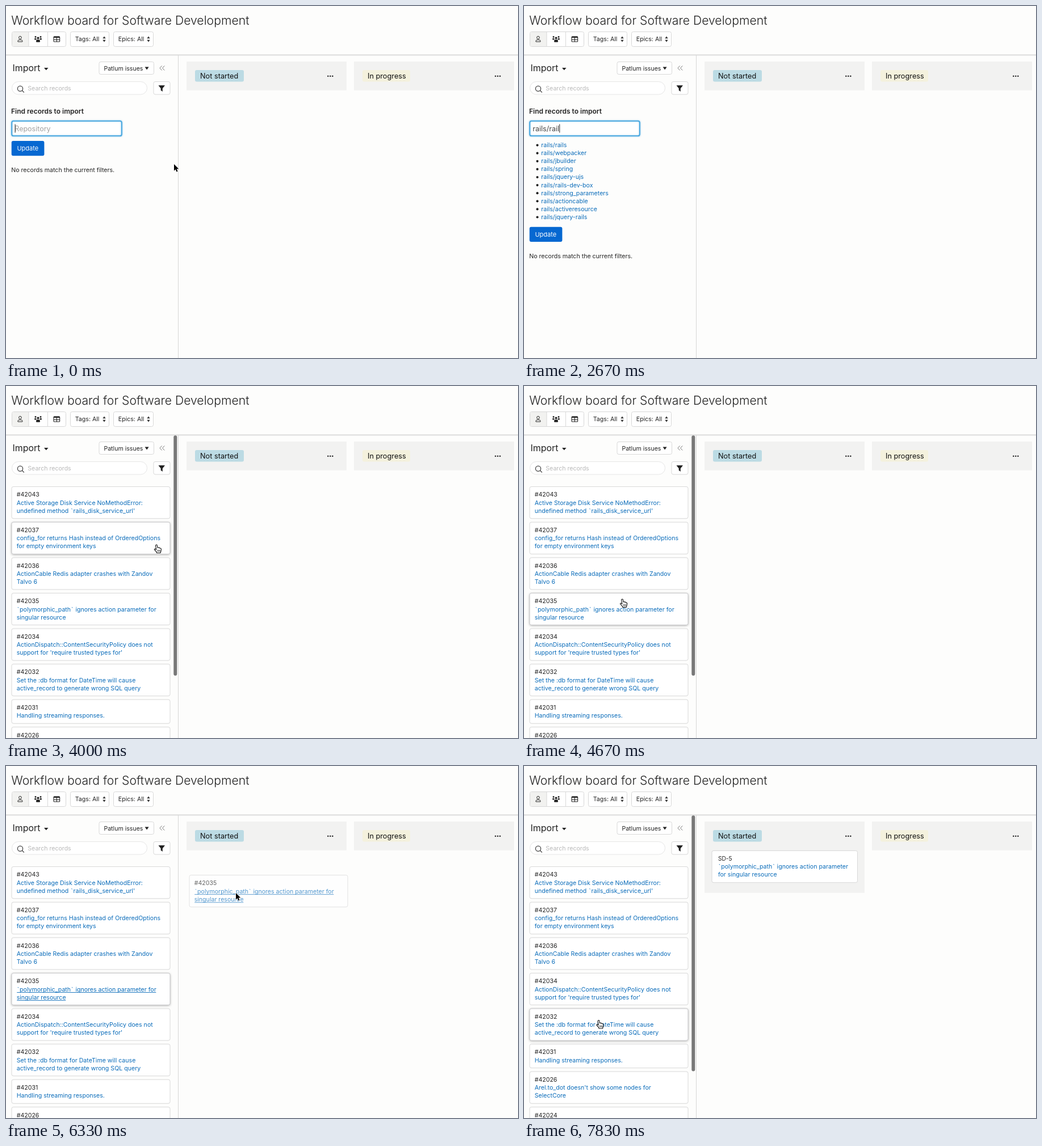
An HTML page with a canvas for the animation above (8000 ms loop, 902 by 621 pixels).

```html
<!DOCTYPE html>
<html lang="en">
<head>
<meta charset="utf-8">
<title>Workflow board</title>
<style>
html, body { margin: 0; width: 100%; height: 100%; overflow: hidden; background: #fdfdfc; }
canvas { display: block; width: 902px; height: 621px; }
</style>
</head>
<body>
<canvas id="stage"></canvas>
<script>
const W = 902, H = 621, LOOP = 8000, FPS = 6;
const canvas = document.getElementById('stage');
const g = canvas.getContext('2d');
const dpr = window.devicePixelRatio || 1;
canvas.width = W * dpr;
canvas.height = H * dpr;

const INK = '#222', LINK = '#0a6cba', EDGE = '#d8d8d8', BODY = 10.6;
const QUERY = 'rails/rails';
const KEYS = [2, 5, 7, 9, 10, 11, 13, 14, 15, 16, 17];
const LIST_ON = 10, LIST_OFF = 19, CARDS_ON = 21;
const GRAB = 33, DROP = 40, SAVED = 44, REMOVED = 46;
const REPOS = ['rails', 'webpacker', 'jbuilder', 'spring', 'jquery-ujs', 'rails-dev-box',
  'strong_parameters', 'actioncable', 'activeresource', 'jquery-rails'];
const ISSUES = [
  [42043, 'Active Storage Disk Service NoMethodError:', "undefined method `rails_disk_service_url'"],
  [42037, 'config_for returns Hash instead of OrderedOptions', 'for empty environment keys'],
  [42036, 'ActionCable Redis adapter crashes with Zandov', 'Talvo 6'],
  [42035, '`polymorphic_path` ignores action parameter for', 'singular resource'],
  [42034, 'ActionDispatch::ContentSecurityPolicy does not', "support for 'require trusted types for'"],
  [42032, 'Set the :db format for DateTime will cause', 'active_record to generate wrong SQL query'],
  [42031, 'Handling streaming responses.'],
  [42026, "Arel.to_dot doesn't show some nodes for", 'SelectCore'],
  [42024, 'Schema dump skips some custom indexes']
];
const MOVED = ISSUES[3];

// Pointer path: step, x, y
const PATH = [
  [22, 296, 279], [24, 260.5, 279.5], [26, 226, 318], [29, 140, 404], [30, 128, 411],
  [32, 128, 411], [33, 92, 397], [34, 120, 382], [38, 405, 224], [39, 430, 210.5],
  [43, 430, 210.5], [44, 424, 217], [45, 376, 256], [46, 252, 350], [47, 127, 448]
];

// Hair spaces give the backticks their wide bearings
const spaced = s => s.replaceAll('`', '\u200a`\u200a');

// Text placed by its left edge and the middle of its capitals; returns its width
function text(s, x, mid, size = BODY, color = INK, weight = 400) {
  const label = spaced(s);
  g.font = `${weight} ${size}px Inter, sans-serif`;
  g.fillStyle = color;
  g.fillText(label, x, mid + size * 0.364);
  return g.measureText(label).width;
}

function box(x, y, w, h, r, fill, stroke, line = 1) {
  g.beginPath();
  g.roundRect(x, y, w, h, r);
  if (fill) { g.fillStyle = fill; g.fill(); }
  if (stroke) { g.strokeStyle = stroke; g.lineWidth = line; g.stroke(); }
}

function poly(points, fill) {
  g.beginPath();
  points.forEach(([x, y]) => g.lineTo(x, y));
  g.closePath();
  g.fillStyle = fill;
  g.fill();
}

function dot(x, y, r, fill) {
  g.beginPath();
  g.arc(x, y, r, 0, Math.PI * 2);
  g.fillStyle = fill;
  g.fill();
}

function stroke(path, color, width) {
  g.strokeStyle = color;
  g.lineWidth = width;
  g.stroke(new Path2D(path));
}

function shadow(color, blur, dy = 0) {
  g.shadowColor = color;
  g.shadowBlur = blur * dpr;
  g.shadowOffsetY = dy * dpr;
}

const noShadow = () => shadow('transparent', 0);

function picker(label, x, w) {
  box(x, 45.5, w, 26, 3, '#fff', EDGE);
  text(label, x + 8.3, 58.5);
  const cx = x + w - 8.5;
  poly([[cx - 2.7, 57.3], [cx, 53.5], [cx + 2.7, 57.3]], '#333');
  poly([[cx - 2.7, 59.7], [cx, 63.5], [cx + 2.7, 59.7]], '#333');
}

function header() {
  text('Workflow board for Software Development', 9.3, 25.3, 21.2, INK, 300);
  box(10.5, 45.5, 95, 26, 3, '#fff', EDGE);
  box(11, 46, 29, 25, [2.5, 0, 0, 2.5], '#f2f2f0');
  stroke('M40 45.5V71.5M73.5 45.5V71.5', EDGE, 1);
  stroke('M27.2 55.8a2.3 2.5 0 1 1-4.6 0a2.3 2.5 0 1 1 4.6 0M20.9 63v-1.2q.2-2 2.2-2h3.6q2 0 2.2 2v1.2z', INK, 1);
  for (const [x, y, r] of [[52, 54.4, 1.5], [61, 54.4, 1.5], [56.5, 56.5, 1.9]]) dot(x, y, r, INK);
  box(53.1, 59.3, 6.8, 4.4, [2.2, 2.2, 0.8, 0.8], INK);
  box(50, 56.9, 3.6, 2.6, 1.1, INK);
  box(59.4, 56.9, 3.6, 2.6, 1.1, INK);
  box(84, 54, 10.6, 9, 1, null, INK, 1.1);
  box(84, 53.7, 10.6, 2.4, 0.8, INK);
  stroke('M84 59.3H94.6M89.3 55V63', INK, 1.1);
  picker('Tags: All', 113.5, 68);
  picker('Epics: All', 189.5, 70);
  g.fillStyle = '#d9d9d9';
  g.fillRect(0, 85.5, W, 1.5);
  g.fillStyle = '#f1f1f1';
  g.fillRect(0, 87, W, 1.2);
}

function column(x, label, badgeW, color, bottom) {
  g.fillStyle = '#f2f2f1';
  g.fillRect(x, 98, 282, bottom - 98);
  box(x + 15, 113, badgeW, 20.5, 3, color);
  text(label, x + 24, 123.5, 12.72, '#111');
  for (const d of [-4, 0, 4]) dot(x + 253.3 + d, 123.7, 1.25, INK);
}

function panelTop() {
  g.fillStyle = '#d6d6d6';
  g.fillRect(303, 87, 1, H);
  text('Import', 11.6, 109.3, 15.9);
  poly([[67, 109], [74.5, 109], [70.75, 113.2]], INK);
  box(164, 98.5, 96.5, 22, 3, '#fff', EDGE);
  text('Patlum issues', 172.4, 110);
  poly([[244.6, 107.6], [251.6, 107.6], [248.1, 112.6]], INK);
  stroke('M274.6 105.5l-3.6 4l3.6 4M279.2 105.5l-3.6 4l3.6 4', '#777', 1);
  box(10.5, 133.5, 238, 22.5, 11.2, '#fff', '#e6e6e6');
  stroke('M29.6 145.7a4.6 4.6 0 1 1-9.2 0a4.6 4.6 0 1 1 9.2 0M28.4 149l3.4 3.6', '#444', 1.3);
  text('Search records', 38.3, 145.3, BODY, '#b9b9b9');
  box(260, 133.5, 29, 22.5, 3, '#fff', EDGE);
  poly([[268.5, 140], [280, 140], [275.8, 145.4], [275.8, 151], [272.7, 148.8], [272.7, 145.4]], INK);
}

function form(n) {
  const typed = QUERY.slice(0, KEYS.filter(k => k <= n).length);
  const open = n >= LIST_ON && n < LIST_OFF;
  const dy = open ? 151.8 : 0;
  text('Find records to import', 9, 186, 12, INK, 600);
  shadow('rgba(70,165,225,.6)', 3);
  box(10.2, 202.8, 193.6, 26.4, 3, '#fff', '#43a5de', 1.8);
  noShadow();
  const width = text(typed || 'Repository', 15.3, 216.3, 12.5, typed ? '#444' : '#a2a2a2');
  if (n !== 1) {
    g.fillStyle = INK;
    g.fillRect(15.6 + (typed ? width : 0), 208.5, 1, 15);
  }
  if (open) REPOS.forEach((repo, i) => {
    const y = 245.2 + i * 14.1;
    dot(23.5, y + 0.4, 2.1, INK);
    text('rails/' + repo, 30.2, y, BODY, LINK);
  });
  box(9.7, 238 + dy, 57.7, 26.3, 3, '#0668d1');
  text('Update', 19.4, 251.3 + dy, 11, '#fff');
  text('No records match the current filters.', 9.2, 289.3 + dy);
}

const cardHeight = issue => 28 + (issue.length - 1) * 14.1;

function card(issue, x, y, hover, underline) {
  const [id, ...lines] = issue;
  const h = cardHeight(issue);
  if (hover) {
    shadow('rgba(0,0,0,.35)', 4, 1);
    box(x, y, 279, h, 3, '#fff');
    noShadow();
  }
  box(x, y, 279, h, 3, '#fff', hover ? '#c6c6c8' : EDGE);
  text('#' + id, x + 8.7, y + 14);
  lines.forEach((line, i) => {
    const mid = y + 28.3 + i * 14.1;
    const width = text(line, x + 8.7, mid, BODY, LINK);
    if (underline) g.fillRect(x + 9.2, mid + 5.4, width - 0.8, 0.9);
  });
}

// Draws the issue list; returns whether the pointer is on a card
function cards(n, p) {
  const dragged = n >= GRAB && n < REMOVED;
  const shown = n < REMOVED ? ISSUES : ISSUES.filter(i => i !== MOVED);
  let y = 177.6, over = false;
  for (const issue of shown) {
    const h = cardHeight(issue);
    const under = p && p.x > 10 && p.x < 289 && p.y > y && p.y < y + h;
    over = over || under;
    const hover = dragged ? issue === MOVED : under;
    card(issue, 10, y, hover, dragged && hover);
    y += h + 6.4;
  }
  if (n < 36 || n >= REMOVED) {
    box(295.3, 87.3, 6, n >= REMOVED ? 451.2 : 423.7, 3, '#787878');
  }
  return over;
}

function boardCard(n) {
  if (n < DROP) return;
  if (n < SAVED) {
    box(331, 149.4, 256.5, 41, 3, '#fff', EDGE);
    text('`polymorphic_path` ignores action', 340.3, 163.3);
    text('parameter for singular resource', 340.3, 177.4);
    const turn = (n - 42) * 1.6;
    g.beginPath();
    g.arc(571.8, 162.7, 6.4, Math.PI * 1.08 + turn, Math.PI * 1.92 + turn);
    g.strokeStyle = '#5db1e4';
    g.lineWidth = 1.6;
    g.stroke();
  } else {
    box(331, 149.4, 256.5, 56.3, 3, '#fff', EDGE);
    text('SD-5', 341.9, 163, 10.2);
    text('`polymorphic_path` ignores action parameter', 341.9, 177.5, BODY, LINK);
    text('for singular resource', 341.9, 191.6, BODY, LINK);
  }
}

const ARROW = new Path2D('M0 0V11.8L2.7 9.3L4.5 13.5L6.5 12.7L4.7 8.5H8.4Z');
const HAND = new Path2D('M4 .8Q5.5 .2 5.8 2L6.4 5.6Q8 4.8 8.7 6Q10.4 5.4 10.9 6.8' +
  'Q12.8 6.6 13 8.5L12.6 11.5L11.5 15H5L4.5 13L1 9.4Q.6 7.8 2.2 7.8L4.2 9.2L3 2.2Q2.9 1 4 .8Z');

function pointer(p, hand) {
  g.save();
  g.translate(p.x, p.y);
  g.lineJoin = 'round';
  const shape = hand ? HAND : ARROW;
  g.strokeStyle = hand ? '#111' : '#fff';
  g.fillStyle = hand ? '#fff' : '#000';
  g.lineWidth = hand ? 1.1 : 1.6;
  if (hand) g.fill(shape);
  g.stroke(shape);
  if (!hand) g.fill(shape);
  if (hand) stroke('M6.7 9.5V13M8.7 9.5V13M10.6 9.5V13', '#111', 0.8);
  g.restore();
}

function pointerAt(n) {
  if (n < 2) return { x: 296, y: 279 };
  if (n < PATH[0][0]) return null;
  const i = PATH.findIndex(k => k[0] >= n);
  const [n1, x1, y1] = PATH[i], [n0, x0, y0] = PATH[Math.max(0, i - 1)];
  const k = n1 > n0 ? (n - n0) / (n1 - n0) : 1;
  return { x: x0 + (x1 - x0) * k, y: y0 + (y1 - y0) * k };
}

function draw(now) {
  const n = Math.floor((now % LOOP + 4) * FPS / 1000) % (LOOP * FPS / 1000);
  const p = pointerAt(n);
  const dragging = n > GRAB && n < DROP;
  g.setTransform(dpr, 0, 0, dpr, 0, 0);
  g.fillStyle = '#fdfdfc';
  g.fillRect(0, 0, W, H);
  column(318, 'Not started', 86, '#bcdbe4', n < DROP ? 148.7 : n < SAVED ? 209.3 : 223.7);
  column(613, 'In progress', 84, '#f4f1dd', 148.7);
  boardCard(n);
  header();
  panelTop();
  let hand = false;
  if (n < CARDS_ON) form(n);
  else hand = cards(n, p);
  if (dragging) {
    g.globalAlpha = 0.7;
    card(MOVED, p.x - 82, p.y - 31.5, false, true);
    g.globalAlpha = 1;
  }
  if (p) pointer(p, hand && !dragging);
}

const start = performance.now();
function tick() {
  draw(performance.now() - start);
  requestAnimationFrame(tick);
}
tick();
</script>
</body>
</html>
```
